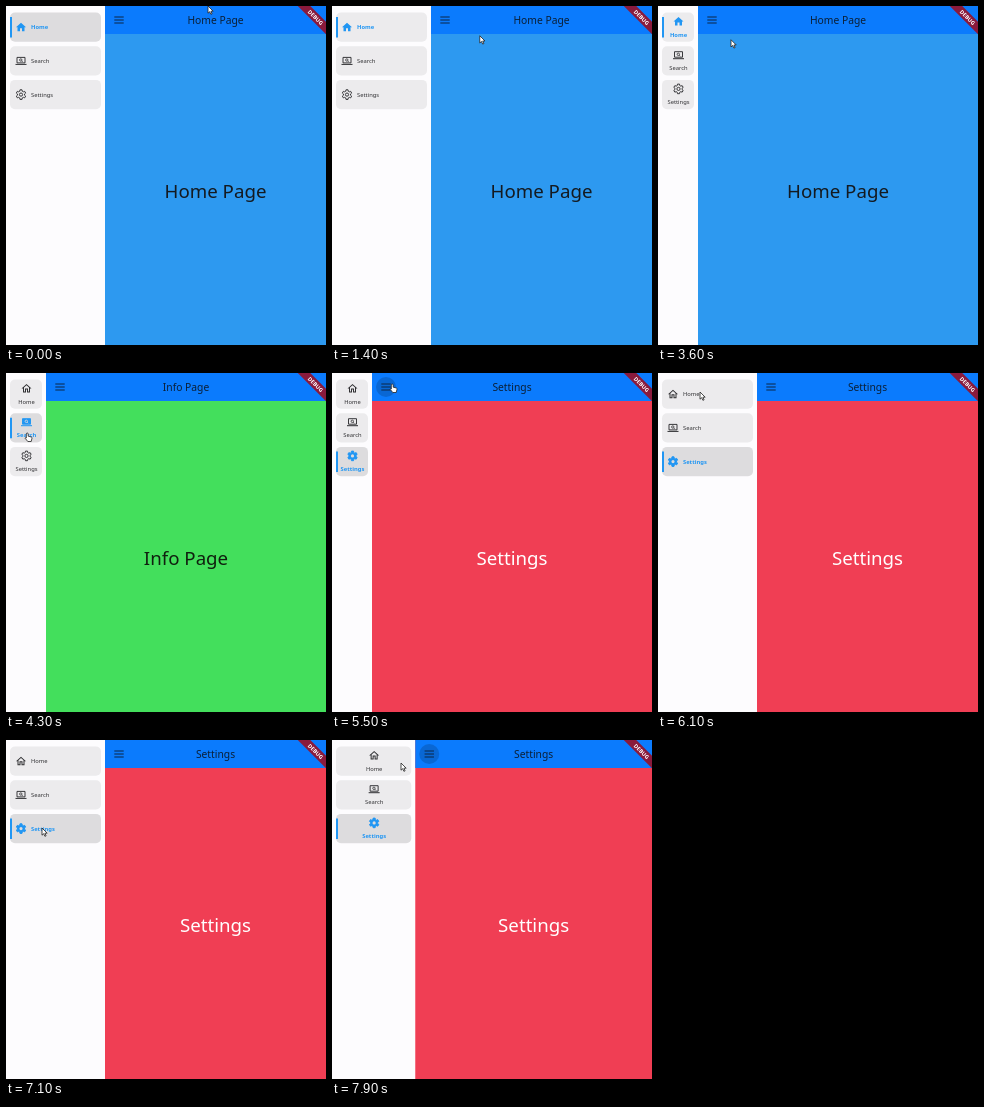
Animation of 320x339 px, one loop 8 s. Source, as an HTML page with a canvas:

```html
<!DOCTYPE html>
<html>
<head>
<meta charset="utf-8">
<style>
html, body { margin: 0; width: 100%; height: 100%; overflow: hidden; background: #fdfcfe; }
canvas { display: block; width: 320px; height: 339px; }
</style>
</head>
<body>
<canvas id="stage" width="320" height="339"></canvas>
<script>
const ctx = document.getElementById('stage').getContext('2d');
const LOOP = 8000, STEP = 100, WIDE = 99, NARROW = 40, SLIDE = 300;
const BLUE = '#2196f3', INK = '#303033';
const FONT = '"Noto Sans", "Open Sans", sans-serif';

const pages = [
  { label: 'Home', title: 'Home Page', fill: '#2d99f0', ink: '#141a20' },
  { label: 'Search', title: 'Info Page', fill: '#43df5c', ink: '#10200f' },
  { label: 'Settings', title: 'Settings', fill: '#f03e54', ink: '#fff' }
];

// [time, page]
const selections = [[0, 0], [4100, 1], [4900, 2], [6200, 0], [6500, 1], [7000, 2]];
// [time, target width]
const slides = [[3200, NARROW], [5600, WIDE], [7820, NARROW]];
// [time, x, y] of the pointer tip
const pointer = [
  [0, 202, 0], [900, 170, 22], [1800, 130, 36], [2700, 106, 20], [2900, 113, 14],
  [3300, 112, 15], [3700, 60, 40], [4100, 20, 60], [4500, 20, 60], [4800, 20, 92],
  [5000, 20, 92], [5300, 59, 11], [5700, 59, 11], [6100, 42, 19], [6250, 41, 21],
  [6600, 35, 62], [6900, 35, 88], [7100, 36, 88], [7600, 111, 15], [7800, 109, 15],
  [7900, 69, 23]
];

const clamp = v => Math.max(0, Math.min(1, v));

function sidebarWidth(t) {
  return slides.reduce((w, [at, to]) => w + (to - w) * clamp((t - at) / SLIDE), WIDE);
}

function pointerAt(t) {
  const i = pointer.findIndex(k => k[0] > t);
  if (i < 0) return pointer[pointer.length - 1].slice(1);
  const [t0, x0, y0] = pointer[i - 1], [t1, x1, y1] = pointer[i];
  const k = (t - t0) / (t1 - t0);
  return [x0 + (x1 - x0) * k, y0 + (y1 - y0) * k];
}

function overMenu(t) {
  const [x, y] = pointerAt(t);
  return Math.hypot(x - sidebarWidth(t) - 14, y - 14) < 9;
}

function rect(x, y, w, h, color, r = 0) {
  ctx.fillStyle = color;
  ctx.beginPath();
  ctx.roundRect(x, y, w, h, r);
  ctx.fill();
}

function text(str, x, y, size, color, align = 'center', weight = 400) {
  ctx.font = `${weight} ${size}px ${FONT}`;
  ctx.textAlign = align;
  ctx.fillStyle = color;
  ctx.fillText(str, x, y);
}

function gearPath() {
  const p = new Path2D();
  for (let i = 0; i < 6; i++) {
    for (const [r, off] of [[7.2, -20], [9.8, -12], [9.8, 12], [7.2, 20]]) {
      const a = (i * 60 + 30 + off) * Math.PI / 180;
      p.lineTo(12 + r * Math.cos(a), 12 + r * Math.sin(a));
    }
  }
  p.closePath();
  return p;
}

const gear = gearPath();
const house = new Path2D('M10 20v-6h4v6h5v-8h3L12 3 2 12h3v8z');
const houseLine = new Path2D('M12 5.69l5 4.5V18h-2v-6H9v6H7v-7.81l5-4.5M12 3L2 12h3v8h6v-6h2v6h6v-8h3z');
const screen = new Path2D('M4 5h16v11H4z');
const lens = new Path2D('M14 10.2a2.4 2.4 0 1 1-4.8 0a2.4 2.4 0 1 1 4.8 0M13.4 12l2 2');
const hub = new Path2D('M15.2 12a3.2 3.2 0 1 1-6.4 0a3.2 3.2 0 1 1 6.4 0');

// Icons use a 24-unit grid drawn at half size.
function icon(i, cx, cy, on, back) {
  ctx.save();
  ctx.translate(cx - 6, cy - 6);
  ctx.scale(.5, .5);
  ctx.fillStyle = ctx.strokeStyle = on ? BLUE : INK;
  ctx.lineWidth = 1.9;
  ctx.lineJoin = 'round';
  if (i === 0) {
    ctx.fill(on ? house : houseLine);
  } else if (i === 1) {
    ctx.stroke(screen);
    if (on) ctx.fill(screen);
    ctx.fillRect(1, 18, 22, 2);
    if (on) ctx.strokeStyle = back;
    ctx.lineWidth = 1.6;
    ctx.stroke(lens);
  } else {
    ctx.stroke(gear);
    if (on) {
      ctx.fill(gear);
      ctx.fillStyle = back;
      ctx.fill(hub);
    } else ctx.stroke(hub);
  }
  ctx.restore();
}

function menuItem(i, w, on, back) {
  const y = 6.5 + i * 33.7, row = w > 90;
  const color = on ? BLUE : INK, weight = on ? 700 : 400;
  rect(4, y, w - 8, 29.3, back, 5);
  if (on) rect(4, y + 4.5, 2, 20.5, BLUE);
  if (row) {
    icon(i, 15, y + 14.7, on, back);
    text(pages[i].label, 25, y + 16.8, 5.8, color, 'left', weight);
  } else {
    icon(i, w / 2 + .5, y + 9, on, back);
    text(pages[i].label, w / 2 + .5, y + 24, 5.8, color, 'center', weight);
  }
}

function banner() {
  ctx.save();
  ctx.translate(309.5, 11.5);
  ctx.rotate(Math.PI / 4);
  rect(-30, -4.4, 60, 8.8, '#8a1a3c');
  text('DEBUG', 0, 2, 5.5, '#fff', 'center', 800);
  ctx.restore();
}

const arrow = new Path2D('M0 0V7.2L1.7 5.7 2.9 8.3 4.1 7.8 2.9 5.2H5.2z');
const hand = new Path2D('M1.2 0Q2.2 0 2.2 1V3.2L5.4 4Q6.2 4.3 6 5.2L5.2 8.5H1.8L-.9 5.2Q-.6 4.3.3 5V1Q.3 0 1.2 0z');

function drawPointer(x, y, pointing) {
  ctx.save();
  ctx.translate(x, y);
  ctx.fillStyle = '#fff';
  ctx.strokeStyle = '#222';
  ctx.lineWidth = .8;
  const shape = pointing ? hand : arrow;
  ctx.fill(shape);
  ctx.stroke(shape);
  ctx.restore();
}

function draw(t) {
  const w = sidebarWidth(t), mid = (w + 320) / 2;
  const current = selections.filter(s => s[0] <= t).pop()[1];
  const page = pages[current];
  const [px, py] = pointerAt(t);

  rect(0, 0, 320, 339, '#fdfcfe');
  pages.forEach((_, i) => {
    const strong = i === current && (t < 1300 || t > 4000);
    menuItem(i, w, i === current, strong ? '#dddcde' : '#ecebed');
  });

  rect(w, 0, 320 - w, 339, page.fill);
  rect(w, 0, 320 - w, 28, '#0b7bfd');
  if (overMenu(t) || overMenu(Math.max(0, t - 200))) {
    rect(w + 4, 4, 20, 20, 'rgba(0,0,0,.16)', 10);
  }
  for (const y of [10.5, 13.5, 16.5]) rect(w + 9.3, y, 9.4, 1, '#0b2545');
  text(page.title, mid, 18.3, 10.3, '#0b2038');
  text(page.title, mid, 191.6, 18.7, page.ink);
  banner();

  const onItem = w < 60 && px > 4 && px < w - 4 && py < 103;
  drawPointer(px, py, overMenu(t) || onItem);
}

const start = performance.now();
function tick() {
  const t = Math.max(0, performance.now() - start) % LOOP;
  draw(Math.floor(t / STEP) * STEP);
  requestAnimationFrame(tick);
}
tick();
</script>
</body>
</html>
```
